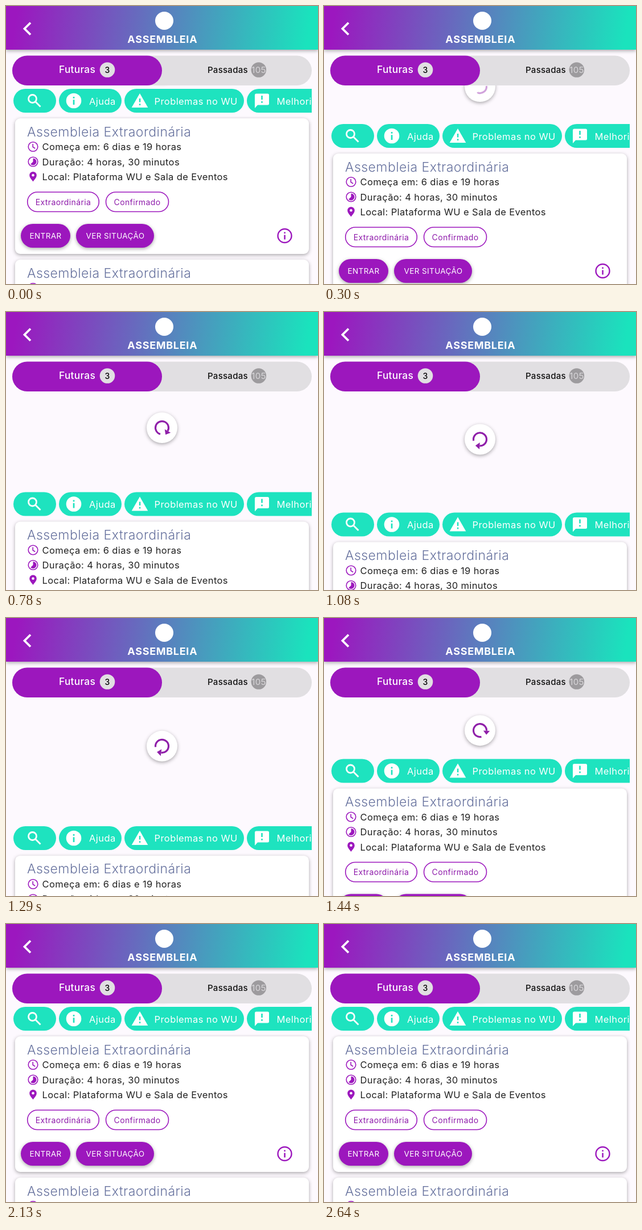
Animation of 548x490 px, one loop 2670 ms. Source, as an HTML page:

```html
<!DOCTYPE html>
<html lang="pt">
<head>
<meta charset="utf-8">
<title>Assembleia</title>
<style>
html, body { margin: 0; width: 100%; height: 100%; overflow: hidden; background: #fdf9fe; }
svg { display: block; width: 548px; height: 490px; font-family: Inter, "Open Sans", sans-serif; }
.body { font-size: 16.5px; letter-spacing: .38px; fill: #222; }
.pill { font-size: 16.5px; letter-spacing: .42px; fill: #fff; }
.heading { font-size: 23px; font-weight: 300; letter-spacing: .45px; fill: #68739f; }
.chip { font-size: 14px; letter-spacing: .38px; fill: #8f1cab; }
.button { font-size: 13.5px; letter-spacing: .4px; fill: #fff; }
.title { font-size: 18px; font-weight: 700; letter-spacing: .7px; fill: #fff; }
.tab { font-weight: 500; letter-spacing: .28px; }
.mid { text-anchor: middle; }
.shadow { filter: drop-shadow(0 2px 3px #0005); }
.line { fill: none; stroke: #9c17bd; stroke-width: 1.6; }
</style>
</head>
<body>
<svg viewBox="0 0 548 490">
  <defs>
    <linearGradient id="brand" gradientUnits="userSpaceOnUse" x1="20" y1="0" x2="528" y2="70">
      <stop stop-color="#9c17bf"/>
      <stop offset="1" stop-color="#1ae3bd"/>
    </linearGradient>
    <clipPath id="view"><path d="M0 140H548V490H0Z"/></clipPath>
    <clipPath id="row"><path d="M11 140H537V200H11Z"/></clipPath>
    <g id="card">
      <rect class="shadow" x="16" y="198" width="516" height="239" rx="9" fill="#fff"/>
      <text class="heading" x="37" y="229.5">Assembleia Extraordinária</text>
      <g class="line">
        <circle cx="47.5" cy="248" r="8.3"/>
        <path d="M47.2 243v5.5l4 2.5"/>
        <circle cx="47.5" cy="274.5" r="8.3"/>
        <rect x="37.7" y="328" width="125.6" height="34.5" rx="17.2"/>
        <rect x="175.5" y="328" width="110" height="34.5" rx="17.2"/>
        <circle cx="489.5" cy="405" r="12" stroke-width="2.4"/>
      </g>
      <g fill="#9c17bd">
        <path d="M47.5 274.5V268.5a6 6 0 1 1-4.3 10.2Z"/>
        <path fill-rule="evenodd" d="M47.5 309.5c-3.5-4.5-6.3-7.5-6.3-11.2a6.3 6.3 0 0 1 12.6 0c0 3.700-2.800 6.700-6.300 11.200Zm0-13.500a2.300 2.300 0 1 0 .01 0Z"/>
        <path d="M488.300 398.500h2.500v2.600h-2.500zM488.300 403.400h2.500v8h-2.500z"/>
        <rect class="shadow" x="26" y="384" width="87" height="42" rx="21"/>
        <rect class="shadow" x="123" y="384" width="137" height="42" rx="21"/>
      </g>
      <g class="body">
        <text x="63.500" y="254">Começa em: 6 dias e 19 horas</text>
        <text x="63.500" y="280.500">Duração: 4 horas, 30 minutos</text>
        <text x="63.500" y="307">Local: Plataforma WU e Sala de Eventos</text>
      </g>
      <text class="chip mid" x="100.500" y="350.500">Extraordinária</text>
      <text class="chip mid" x="230.500" y="350.500">Confirmado</text>
      <text class="button mid" x="69.500" y="409.500">ENTRAR</text>
      <text class="button mid" x="192" y="409.500">VER SITUAÇÃO</text>
    </g>
  </defs>

  <rect width="548" height="490" fill="#fdf9fe"/>
  <g clip-path="url(#view)">
    <g id="content">
      <g clip-path="url(#row)">
        <g fill="#1ee3bf">
          <rect x="13" y="146" width="75" height="42" rx="21"/>
          <rect x="93" y="146" width="110" height="42" rx="21"/>
          <rect x="208" y="146" width="210" height="42" rx="21"/>
          <rect x="423" y="146" width="150" height="42" rx="21"/>
        </g>
        <g fill="none" stroke="#fff" stroke-width="2.800">
          <circle cx="46.500" cy="163.500" r="7"/>
          <path d="M51.500 168.500l9 9"/>
        </g>
        <g fill="#fff">
          <circle cx="119" cy="167" r="13.300"/>
          <path d="M235 154l14.300 25h-28.600z"/>
          <path d="M439.500 154.500h20a2.500 2.500 0 0 1 2.500 2.500v15a2.500 2.500 0 0 1-2.500 2.500h-17.500l-5 5.500v-23a2.500 2.500 0 0 1 2.500-2.500z"/>
        </g>
        <path fill="#1ee3bf" d="M117.700 160h2.700v2.700h-2.700zM117.700 165.300h2.700v8.700h-2.700zM233.800 163h2.500v6.500h-2.500zM233.800 172.300h2.500v2.600h-2.500zM448.200 158h2.600v7h-2.600zM448.200 168h2.600v2.700h-2.600z"/>
        <g class="pill">
          <text x="146" y="173.500">Ajuda</text>
          <text x="260.500" y="173.500">Problemas no WU</text>
          <text x="475.500" y="173.500">Melhorias</text>
        </g>
      </g>
      <use href="#card"/>
      <use href="#card" y="249"/>
    </g>
    <g id="spinner">
      <circle class="shadow" r="27" fill="#fff"/>
      <g id="arrow">
        <path id="arc" fill="none" stroke="#8f1fa9" stroke-width="3.200"/>
        <path id="tip" fill="#8f1fa9" d="M5.500 0h12l-6 7.500z"/>
      </g>
    </g>
  </g>

  <rect class="shadow" width="548" height="77" fill="url(#brand)"/>
  <path d="M43 29.500L32.500 40l10.500 10.500" fill="none" stroke="#fff" stroke-width="3.800"/>
  <circle cx="278" cy="26" r="16" fill="#fff"/>
  <text class="title mid" x="274.800" y="65">ASSEMBLEIA</text>

  <rect x="11" y="87.500" width="526" height="52.500" rx="26.200" fill="#e1dfe2"/>
  <rect x="11" y="87.500" width="263" height="52.500" rx="26.200" fill="#9c17bd"/>
  <circle cx="178" cy="112.500" r="13.300" fill="#e1dfe2"/>
  <circle cx="443.800" cy="112.500" r="13.300" fill="#9d9b9e"/>
  <g class="tab">
    <text x="93" y="118" font-size="17.300" fill="#fff">Futuras</text>
    <text class="mid" x="178" y="117.500" font-size="14">3</text>
    <text x="354" y="117.500" font-size="15" fill="#111">Passadas</text>
    <text class="mid" x="444" y="117.800" font-size="15" font-weight="400" fill="#d9d7da">105</text>
  </g>
</svg>
<script>
const LOOP = 2670, STEP = 30, RELEASE = 1390, STALL = 1470, RESUME = 1620;
const $ = id => document.getElementById(id);

// time, pull distance, speed
const keys = [
  [0, 0, .12], [300, 62, .25], [780, 171.5, .17],
  [1080, 207.5, .06], [1380, 212, -.2], [1440, 102.5, -1.6], [STALL, 68, -.8]
];

function pullAt(t) {
  if (t >= RESUME) return t > 2000 ? 0 : 14 * Math.exp((RESUME - t) / 90);
  t = Math.min(t, STALL);
  const i = keys.findIndex((k, n) => n && t <= k[0]);
  const [t0, a, va] = keys[i - 1], [t1, b, vb] = keys[i];
  const span = t1 - t0, u = (t - t0) / span, w = 1 - u;
  return a * w * w * (1 + 2 * u) + b * u * u * (3 - 2 * u)
    + span * u * w * (va * w - vb * u);
}

// The spinner follows the pull, then withdraws steadily after release.
function spinnerPull(t) {
  if (t < RELEASE) return Math.min(pullAt(t), 210);
  return t < RESUME ? 210 - (Math.min(t, STALL) - RELEASE) * .98 : 0;
}

function drawSpinner(pull) {
  const sweep = Math.min(285, pull * 1.8) * Math.PI / 180;
  const end = 30 + (pull - 171.5) * (pull < 171.5 ? 2.6 : 1.75);
  const r = 11.5, large = sweep > Math.PI ? 1 : 0;
  $('spinner').setAttribute('transform', `translate(274 ${107 + .566 * pull})`);
  $('arrow').setAttribute('transform', `rotate(${end})`);
  $('arrow').setAttribute('opacity', Math.min(1, pull / 150));
  $('arc').setAttribute('d',
    `M${r * Math.cos(sweep)} ${-r * Math.sin(sweep)}A${r} ${r} 0 ${large} 1 ${r} 0`);
  const size = Math.min(1, pull / 170);
  $('tip').setAttribute('transform', `translate(${r * (1 - size)}) scale(${size})`);
}

function draw() {
  const t = Math.floor(performance.now() % LOOP / STEP) * STEP;
  $('content').setAttribute('transform', `translate(0 ${pullAt(t)})`);
  drawSpinner(spinnerPull(t));
  requestAnimationFrame(draw);
}
draw();
</script>
</body>
</html>
```
